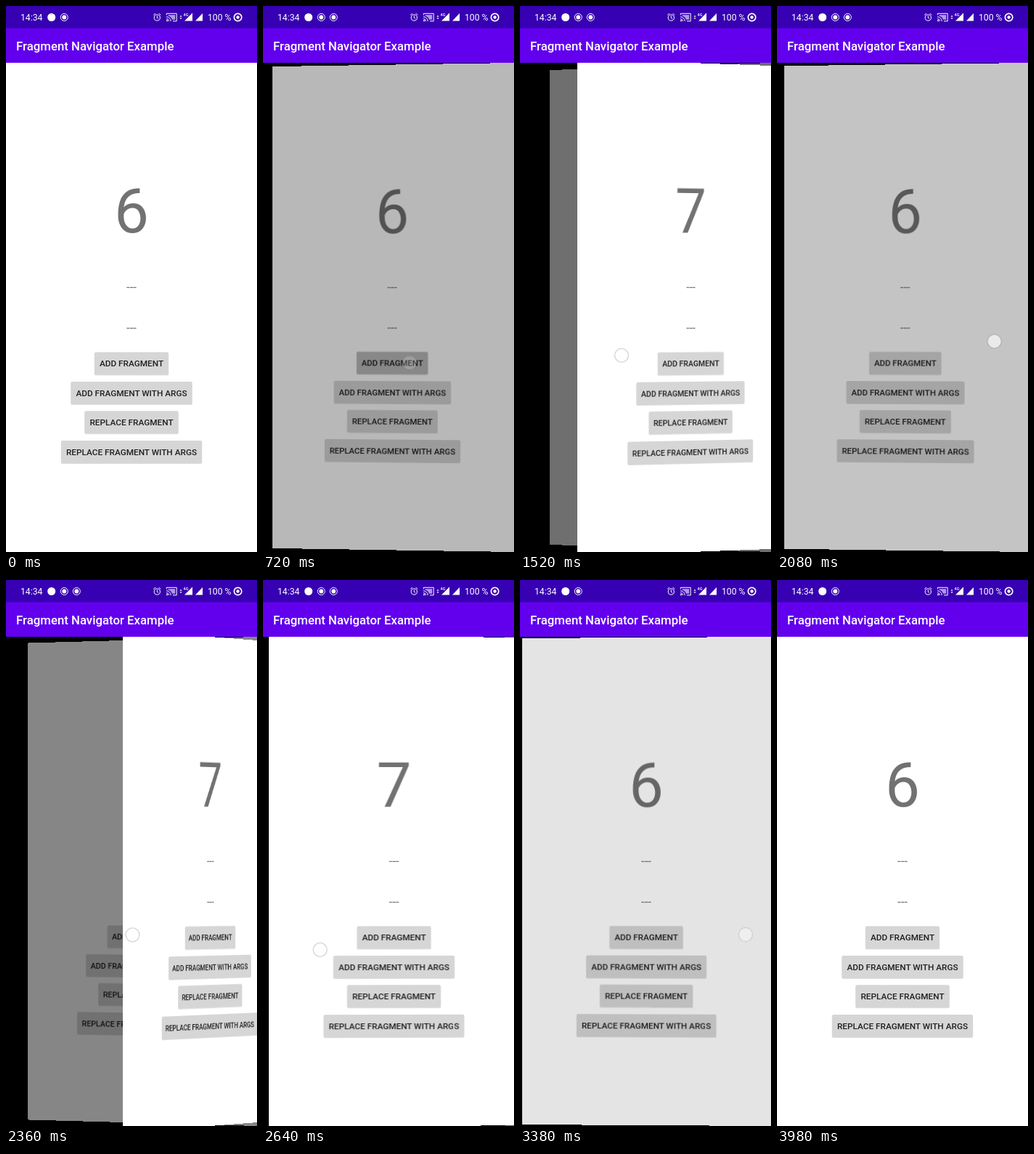
Write an HTML page that moves like this. It is 346 by 750 pixels and loops after 4 s.

```html
<!DOCTYPE html>
<html lang="en">
<head>
<meta charset="utf-8">
<title>Fragment Navigator Example</title>
<style>
  html, body { margin: 0; width: 100%; height: 100%; overflow: hidden; background: #000; }
  #stage { position: relative; width: 346px; height: 750px; overflow: hidden; background: #000; }
  #pages { position: absolute; left: 0; top: 78px; width: 346px; height: 672px; overflow: hidden; }
  svg { position: absolute; left: 0; top: 0; display: block; font-family: Roboto, Arial, sans-serif; }
  #below { transform-origin: 100% 50%; }
  #above { transform-origin: 50% 50%; }
</style>
</head>
<body>
<div id="stage">
  <div id="pages"></div>
  <svg id="chrome" width="346" height="750" viewBox="0 0 346 750">
    <rect width="346" height="31" fill="#3700b3"/>
    <rect y="30.5" width="346" height="47.5" fill="#6200ee"/>
    <g fill="#fff">
      <text x="14" y="61" font-size="16.8" font-weight="500">Fragment Navigator Example</text>
      <text x="20" y="20" font-size="12.2">14:34</text>
      <text x="278" y="20" font-size="12.2">100 %</text>
      <circle cx="62.7" cy="15.5" r="5.5"/>
      <circle cx="80.3" cy="15.5" r="2.9"/>
      <circle cx="319.6" cy="15.5" r="2.2"/>
      <path d="M246 20.5L257 9.5V20.5ZM261 20.5L271 10V20.5Z"/>
      <text x="244.5" y="13.5" font-size="5.5" font-weight="500">4G</text>
      <path d="M239.5 14.8l1.5-2 1.5 2zM239.5 16.2l1.5 2 1.5-2z"/>
    </g>
    <g fill="none" stroke="#fff">
      <circle cx="80.3" cy="15.5" r="5"/>
      <circle cx="319.6" cy="15.5" r="5.2" stroke-width="1.7"/>
      <circle cx="208.3" cy="16" r="4.1"/>
      <path d="M208.3 13.4V16.3L210.2 17.5M203.3 12.4L206 10.2M213.3 12.4L210.6 10.2"/>
      <path d="M221.3 12.5V10.3H235.2V20.8H230M221 14.8a6.2 6.2 0 0 1 6.2 6.2M221 17.6a3.4 3.4 0 0 1 3.4 3.4"/>
    </g>
    <path d="M223.5 12.3H233.2V18.7H229Q227.5 14.5 223.5 13.6Z" fill="#fff" opacity=".6"/>
    <circle cx="222" cy="20.2" r="1" fill="#fff"/>
    <g id="notice">
      <circle cx="97.3" cy="15.5" r="5" fill="none" stroke="#fff"/>
      <circle cx="97.3" cy="15.5" r="2.9" fill="#fff"/>
    </g>
    <g id="touch">
      <circle r="9.5" fill="#fff" fill-opacity=".65" stroke="#787878" stroke-opacity=".3" stroke-width="1.4"/>
    </g>
  </svg>
</div>
<script>
const LOOP = 4000, WIDTH = 346, DEPTH = 4660;
const GRAB = 72, LAG = 12;
const BUTTONS = [
  ["ADD FRAGMENT", 102, 475.5],
  ["ADD FRAGMENT WITH ARGS", 167, 516],
  ["REPLACE FRAGMENT", 129, 556.3],
  ["REPLACE FRAGMENT WITH ARGS", 194, 597]
];
// Drag path: time, x, y at each turning point
const DRAG = [[1275, 76, 488], [1980, 312, 458], [2665, 78, 508], [3250, 311, 487]];
const RELEASE = 3313;

const $ = id => document.getElementById(id);
const clamp = v => Math.min(1, Math.max(0, v));
const span = (t, a, b) => clamp((t - a) / (b - a));
const smooth = u => (1 - Math.cos(Math.PI * u)) / 2;

function button([label, w, y]) {
  const x = 173 - w / 2;
  return `<rect x="${x - .3}" y="${y + .7}" width="${w + .6}" height="31.2" rx="2" fill="#000" opacity=".13"/>
    <rect x="${x}" y="${y}" width="${w}" height="31" rx="1.7" fill="#d6d6d6"/>
    <text x="173" y="${y + 19.8}" font-size="11.8" font-weight="500" fill="#202020">${label}</text>`;
}

function page(id, digit) {
  const [, w, y] = BUTTONS[0];
  return `<svg id="${id}" width="346" height="672" viewBox="0 78 346 672" text-anchor="middle">
    <rect y="78" width="346" height="672" fill="#fff"/>
    <g fill="#727272">
      <text x="173" y="311" font-size="85.5">${digit}</text>
      <text x="173" y="392" font-size="16.8">---</text>
      <text x="173" y="448" font-size="16.8">---</text>
    </g>
    ${BUTTONS.map(button).join("")}
    <rect class="press" x="${173 - w / 2}" y="${y}" width="${w}" height="31" rx="1.7" opacity="0"/>
    <rect class="shade" y="78" width="346" height="672" opacity="0"/>
  </svg>`;
}

$("pages").innerHTML = page("below", 6) + page("above", 7);
const below = $("below"), above = $("above"), touch = $("touch");
const shade = below.querySelector(".shade"), press = below.querySelector(".press");

function finger(t) {
  let i = 0;
  while (i < DRAG.length - 2 && t > DRAG[i + 1][0]) i++;
  const [t0, x0, y0] = DRAG[i], [t1, x1, y1] = DRAG[i + 1];
  const u = smooth(span(t, t0, t1));
  return [x0 + (x1 - x0) * u, y0 + (y1 - y0) * u];
}

// 1 = upper page is away, 0 = it covers the screen
function pageOffset(t) {
  if (t < DRAG[0][0]) return 1 - smooth(span(t, 555, 935));
  const dragged = clamp((finger(t - LAG)[0] - GRAB) / WIDTH);
  const settle = 1 - (1 - span(t, RELEASE, RELEASE + 320)) ** 3;
  return dragged + (1 - dragged) * settle;
}

function draw(t) {
  const d = pageOffset(t), cover = 1 - d;
  below.style.transform = `perspective(${DEPTH}px) rotateY(${-30 * cover}deg)`;
  shade.setAttribute("opacity", .69 * cover);
  above.style.visibility = d < .59 ? "visible" : "hidden";
  above.style.transform = `translateX(${WIDTH * d}px) perspective(${DEPTH}px) rotateY(${150 * d}deg)`;
  press.setAttribute("opacity", .12 * span(t, 450, 530) * (1 - span(t, 740, 900)));

  const tapping = t < 1000;
  const [x, y] = tapping ? [202, 490] : finger(t);
  const alpha = tapping
    ? span(t, 440, 460) * (1 - span(t, 580, 800)) * .8
    : span(t, 1240, 1270) * (1 - span(t, RELEASE, RELEASE + 200));
  touch.setAttribute("transform", `translate(${x} ${y})`);
  touch.setAttribute("opacity", alpha);
  $("notice").setAttribute("opacity", t > 600 && t < RELEASE + 40 ? 1 : 0);
}

const begin = performance.now();
function tick() {
  draw((performance.now() - begin) % LOOP);
  requestAnimationFrame(tick);
}
tick();
</script>
</body>
</html>
```
